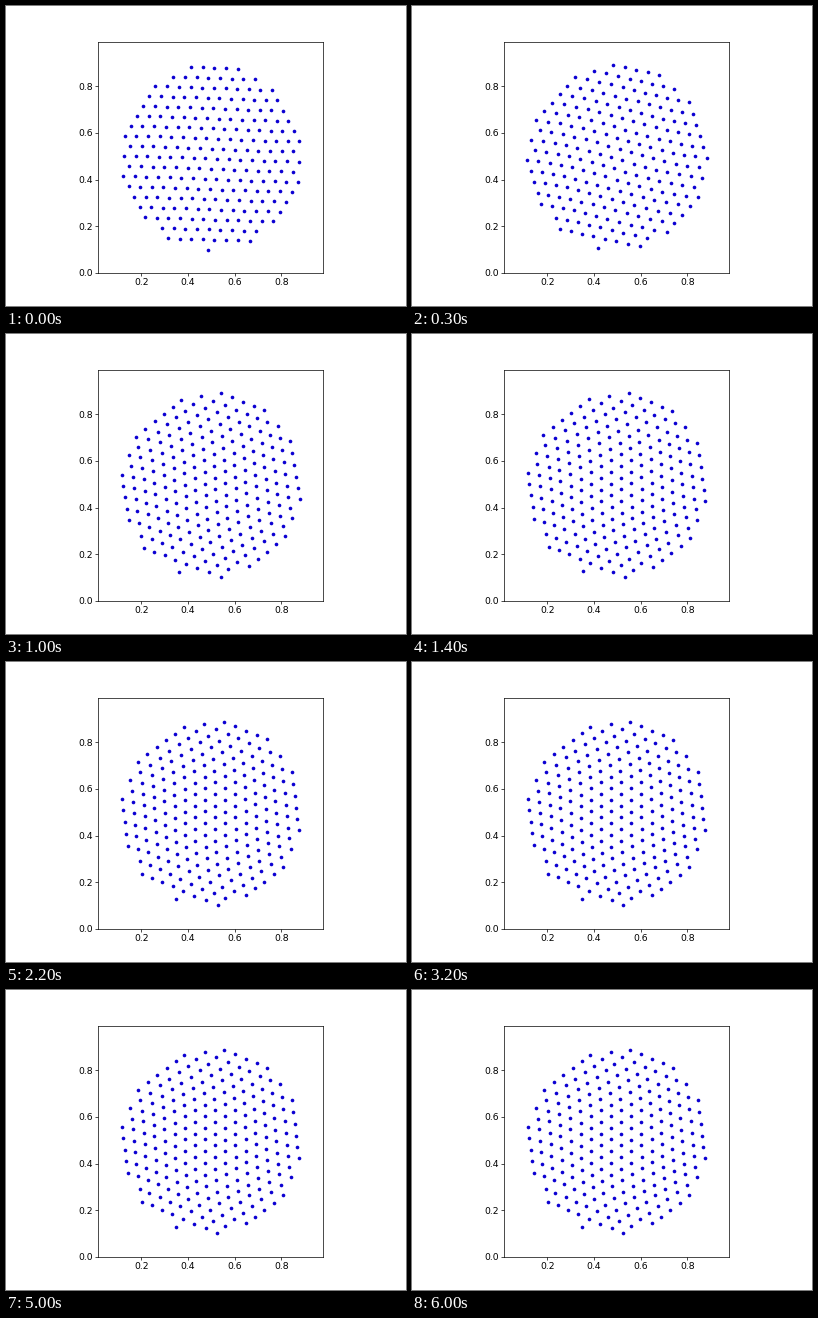
A matplotlib script that plays this animation: 400 by 300 pixels, repeating every 6.1 s.

```python
import numpy as np
import matplotlib.pyplot as plt
from matplotlib.animation import FuncAnimation

FRAMES, INTERVAL = 61, 100
WIDTH, HEIGHT, DPI = 400, 300, 62.5
SPACING, RADIUS, CENTER = 0.05, 0.4, 0.5
TURN = np.radians(30.8)    # final turn at the centre
DECAY, LEAD = 0.23, 0.37   # spin-down per frame, head start in frames

plt.rcParams["font.family"] = "DejaVu Sans"


def hex_disc():
    """Hexagonal lattice cut to a disc, relative to its centre."""
    points = []
    for row in range(19):
        y = row * SPACING * np.sqrt(3) / 2 - RADIUS
        shift = SPACING / 2 * (row % 2)
        for col in range(-9, 10):
            x = col * SPACING + shift
            if np.hypot(x, y) <= RADIUS + 1e-9:
                points.append((x, y))
    return np.array(points)


start = hex_disc()
radius = np.hypot(start[:, 0], start[:, 1])
angle = np.arctan2(start[:, 1], start[:, 0])
swirl = TURN * np.exp(-2 * radius**2)


def positions(frame):
    turned = angle - swirl * (1 - np.exp(-DECAY * (frame + LEAD)))
    return CENTER + radius * np.cos(turned), CENTER + radius * np.sin(turned)


fig = plt.figure(figsize=(WIDTH / DPI, HEIGHT / DPI), dpi=DPI,
                 facecolor="white")
ax = fig.add_axes([92.1 / WIDTH, 33 / HEIGHT, 225.2 / WIDTH, 231 / HEIGHT])
ax.set_xlim(0.0145, 0.9795)
ax.set_ylim(0, 0.99)
ax.set_xticks([0.2, 0.4, 0.6, 0.8])
ax.set_yticks([0.0, 0.2, 0.4, 0.6, 0.8])
ax.tick_params(labelsize=10.6, pad=2.6)
dots, = ax.plot(*positions(0), "o", color="#0c00d2", ms=4.2, mew=0)


def update(frame):
    dots.set_data(*positions(frame))
    return dots,


anim = FuncAnimation(fig, update, frames=FRAMES, interval=INTERVAL,
                     repeat=True, repeat_delay=0)
plt.show()
```
